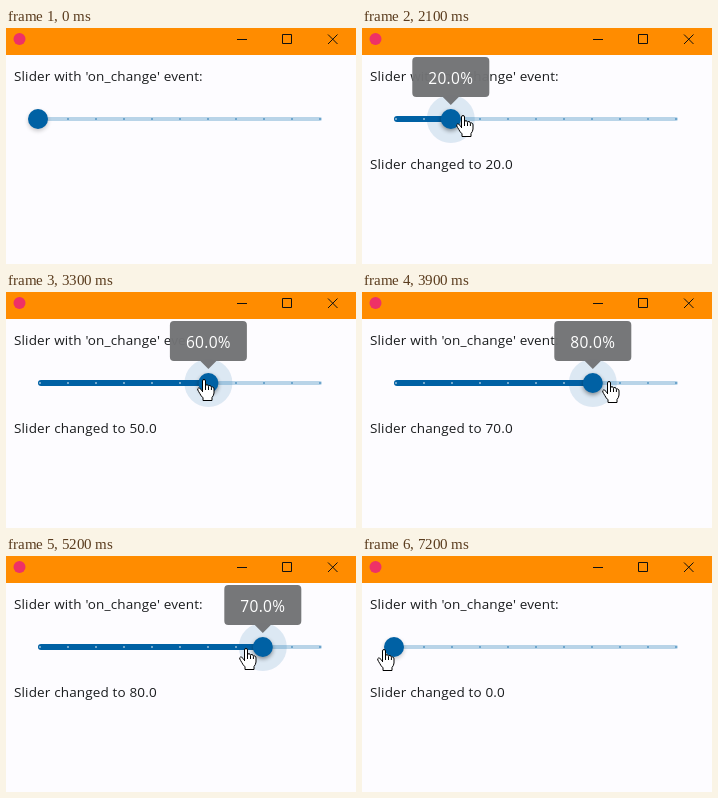
An HTML page that plays this animation: 350 px wide and 236 px high, repeating every 7.4 s.

```html
<!DOCTYPE html>
<html lang="en">
<head>
<meta charset="utf-8">
<title>Slider with on_change event</title>
<style>
html, body { margin: 0; width: 100%; height: 100%; overflow: hidden; background: #fdfcff; }
svg { display: block; width: 350px; height: 236px; }
text { font: 13.5px "Open Sans", sans-serif; letter-spacing: .15px; fill: #1a1c1e; }
#tip text { font-size: 15.5px; letter-spacing: .3px; fill: #fff; text-anchor: middle; }
</style>
</head>
<body>
<svg viewBox="0 0 350 236">
  <defs>
    <filter id="blur" x="-50%" y="-50%" width="200%" height="200%"><feGaussianBlur stdDeviation="2"/></filter>
  </defs>
  <rect width="350" height="236" fill="#fdfcff"/>
  <rect width="350" height="27" fill="#ff8c00"/>
  <circle cx="13.5" cy="11" r="6" fill="#ee3167"/>
  <path d="M231 11.5h10M276.5 6.5h9v9h-9zM322 6.500l9.500 9.500M331.500 6.500l-9.500 9.500" fill="none" stroke="#111"/>

  <text x="8" y="53">Slider with 'on_change' event:</text>
  <text id="status" x="8" y="141"></text>

  <rect x="32" y="89" width="284" height="4" rx="2" fill="#b9d4e8"/>
  <rect id="active" x="32" y="88" height="6" rx="3" fill="#0061a4"/>
  <circle id="halo" cy="91" fill="#0061a4" fill-opacity=".13"/>
  <g id="ticks"></g>
  <g id="thumb">
    <circle id="shade" cy="2" r="10" filter="url(#blur)"/>
    <circle r="10" fill="#0061a4"/>
  </g>
  <g id="tip">
    <path id="bubble" fill="#727375" fill-opacity=".97"/>
    <text id="value" y="56"></text>
  </g>
  <g id="hand" stroke="#000" stroke-linejoin="round">
    <path fill="#fff" d="M5.500 13V2Q5.500.5 7 .5T8.500 2V7Q8.700 5.600 10 5.600Q11.300 5.800 11.500 7.400Q11.800 6.300 13 6.500Q14.300 6.800 14.400 8.300Q15 7.600 16 8Q17 8.500 17 10V14Q16.800 16.500 15 18.500V21.500H6V18.800Q4 17 2.800 14.500Q1.500 12.400 .8 11Q.3 9.500 1.500 9Q2.800 8.800 4 10.400L5.500 12.500Z"/>
    <path fill="none" d="M8.500 7v4M11.500 7.500v3.500M14.400 8.500v2.500"/>
  </g>
</svg>
<script>
const LOOP = 7400, STEP = 100, LAG = 150;
const PRESS = 650, RELEASE = 7000;
const $ = id => document.getElementById(id);
const set = (el, attrs) => { for (const k in attrs) el.setAttribute(k, attrs[k]); };
const clamp = v => Math.max(0, Math.min(1, v));
const lerp = (a, b, u) => a + (b - a) * u;

// [ms, slider division]
const moves = [
  [0, 0], [1100, 1], [1605, 2], [2300, 3], [2500, 4], [2900, 5], [3200, 6],
  [3700, 7], [3900, 8], [4200, 9], [4520, 10], [4850, 9], [5010, 8], [5192, 7],
  [5600, 6], [5700, 5], [5800, 4], [5900, 3], [6000, 2], [6150, 1], [6520, 0]
];
// [ms, x, y] of the fingertip
const path = [
  [100, 209, 96], [200, 150, 96], [300, 92, 95], [400, 52, 94], [500, 34, 93],
  [700, 34, 93], [1100, 49, 91], [1400, 62, 89], [1500, 62, 89], [1800, 98, 87],
  [1900, 98, 87], [2100, 101, 87], [2700, 158, 87], [3300, 198, 87], [3500, 201, 87],
  [4300, 293, 90], [4500, 303, 91], [4700, 308, 91], [4900, 293, 92], [5200, 240, 92],
  [5400, 228, 92], [5500, 228, 92], [6100, 79, 94], [6300, 52, 94], [6500, 52, 94],
  [6700, 25, 94], [6900, 25, 94], [7200, 22, 93]
];

const ticks = Array.from({ length: 11 }, (_, i) => {
  const c = document.createElementNS("http://www.w3.org/2000/svg", "circle");
  set(c, { cx: 34 + 28 * i, cy: 91, r: 1 });
  return $("ticks").appendChild(c);
});

const lastMove = t => {
  let i = 0;
  while (i + 1 < moves.length && moves[i + 1][0] <= t) i++;
  return i;
};

function thumbX(t) {
  const i = lastMove(t), from = moves[Math.max(0, i - 1)][1];
  return 32 + 28.4 * lerp(from, moves[i][1], clamp((t - moves[i][0]) / 95));
}

function fingertip(t) {
  let i = 0;
  while (i + 2 < path.length && path[i + 1][0] <= t) i++;
  const a = path[i], b = path[i + 1], u = clamp((t - a[0]) / (b[0] - a[0]));
  return [lerp(a[1], b[1], u), lerp(a[2], b[2], u)];
}

function drawTip(t, x) {
  const scale = Math.min(clamp((t - PRESS) / 100), 1 - clamp((t - RELEASE) / 100));
  const label = moves[lastMove(t)][1] * 10 + ".0%";
  const w = 77 + 9 * (label.length - 5);
  const left = Math.max(6, Math.min(342 - w, x - w / 2));
  set($("tip"), { transform: `translate(${x} 91) scale(${scale}) translate(${-x} -91)` });
  set($("bubble"), {
    d: `M${left + 4} 29h${w - 8}q4 0 4 4v32q0 4 -4 4H${x + 8}L${x} 77L${x - 8} 69H${left + 4}q-4 0 -4 -4v-32q0 -4 4 -4z`
  });
  $("value").textContent = label;
  set($("value"), { x: left + w / 2 });
}

function draw(t) {
  const x = thumbX(t);
  const pressed = t >= PRESS && t < RELEASE + 100;
  const glow = 1 - clamp((t - RELEASE) / 200);

  set($("active"), { width: x - 32 });
  ticks.forEach((c, i) => {
    const on = 34 + 28 * i < x;
    set(c, { fill: on ? "#fff" : "#0061a4", "fill-opacity": on ? 0.6 : 0.54 });
  });
  set($("halo"), { cx: x, r: 24 * clamp((t - 350) / 150), opacity: glow });
  set($("thumb"), { transform: `translate(${x} 91)` });
  set($("shade"), { opacity: pressed ? 0.4 : 0.22 });
  drawTip(t, x);

  const seen = lastMove(t - LAG);
  $("status").textContent = seen ? `Slider changed to ${moves[seen][1] * 10}.0` : "";

  const [px, py] = fingertip(t);
  set($("hand"), {
    transform: `translate(${Math.round(px - 7)} ${Math.round(py)})`,
    visibility: t < 100 ? "hidden" : "visible"
  });
}

const start = performance.now();
function tick() {
  const t = Math.max(0, performance.now() - start) % LOOP;
  draw(Math.floor(t / STEP) * STEP);
  requestAnimationFrame(tick);
}
tick();
</script>
</body>
</html>
```
